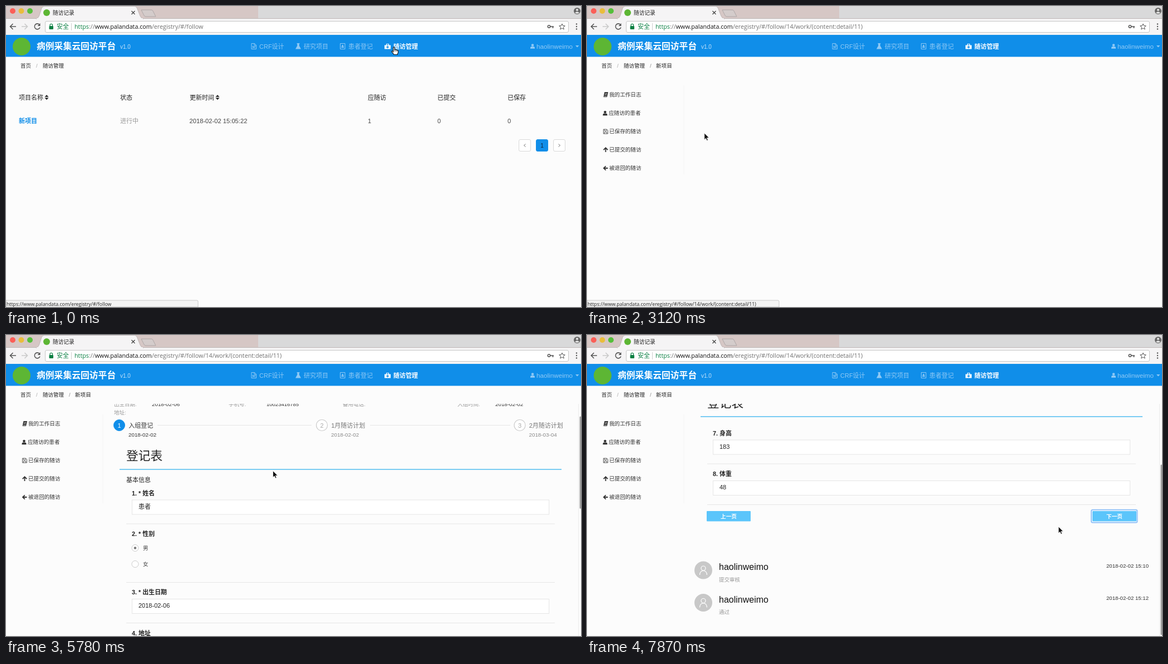
Write an HTML page that moves like this. It is 1033 px wide and 542 px high and loops after 8 s.

```html
<!DOCTYPE html>
<html lang="zh">
<head>
<meta charset="utf-8">
<title>随访记录</title>
<style>
html,body{margin:0;width:100%;height:100%;overflow:hidden;background:#fcfcfc}
svg{display:block;width:1033px;height:542px}
text{font-family:'Liberation Sans','Noto Sans CJK SC','Noto Sans CJK',sans-serif;white-space:pre}
.ui{font-family:'Open Sans','Noto Sans CJK SC','Noto Sans CJK',sans-serif}
</style>
</head>
<body>
<svg id="stage" viewBox="0 0 1033 542" xmlns="http://www.w3.org/2000/svg"></svg>
<script>
const STEP = 148.3, LOOP = 8000;
const BLUE = '#108ee9', SKY = '#5bc5fb', DARK = '#333', GRAY = '#999';
const USER = 'haolinweimo', PHONE = '10023416785', BRAND = '病例采集云回访平台';
const SITE = 'https://www.palandata.com/eregistry/#/follow';
const SHOULD = '/14/work/(content:should)', DETAIL = '/14/work/(content:detail/11)';

// Drawing helpers; text is placed by its vertical centre.
const text = (x, y, s, size = 11, fill = DARK, more = '') =>
  `<text x="${x}" y="${(y + size * .37).toFixed(2)}" font-size="${size}" fill="${fill}" ${more}>${s}</text>`;
const bold = 'font-weight="700"', medium = 'font-weight="500"', mid = 'text-anchor="middle"';
const rect = (x, y, w, h, fill, more = '') =>
  `<rect x="${x}" y="${y}" width="${w}" height="${h}" fill="${fill}" ${more}/>`;
const circle = (x, y, r, fill, more = '') => `<circle cx="${x}" cy="${y}" r="${r}" fill="${fill}" ${more}/>`;
const path = (d, fill, more = '') => `<path d="${d}" fill="${fill}" ${more}/>`;
const line = (d, stroke, w = 1) => path(d, 'none', `stroke="${stroke}" stroke-width="${w}"`);
const group = (id, body, more = '') => `<g id="${id}" ${more}>${body}</g>`;
const at = (x, y, body) => `<g transform="translate(${x} ${y})">${body}</g>`;
const hr = (y, x1 = 216, x2 = 986, c = '#e6e6e6') => line(`M${x1} ${y}H${x2}`, c);
const sort = (x, y, k = 1) => at(x, y, path(`M${-3.6 * k} -.8L0 ${-4.4 * k} ${3.6 * k} -.8ZM${-3.6 * k} .8L0 ${4.4 * k} ${3.6 * k} .8Z`, '#222'));
const person = (x, y, c) => at(x, y, circle(0, -2, 2.3, c) + path('M-4 4.3V2.8Q-4 .4 -1.8 .4H1.8Q4 .4 4 2.8V4.3Z', c));

function browser() {
  const mark = '#5db634';
  return rect(0, 0, 1033, 23, '#d9d9da') + rect(0, 0, 453, 23, '#d6c7c5') +
    circle(12, 9, 5, '#fb5e57') + circle(27.5, 9, 5, '#e9bd3b') + circle(43, 9, 5, '#55bf3a') +
    rect(0, 22, 1033, 30, '#f5f4f5') + line('M0 22.5H1033', '#bdb6b6') +
    path('M54 23Q58 22 59.5 18L64 4Q65.500 .5 69 .5H231Q234 .5 235.500 4L241 18Q242.500 22 247 23Z', '#f5f4f5', 'stroke="#b5aeae" stroke-width=".8"') +
    rect(55, 22, 191, 3, '#f5f4f5') +
    path('M243 7H261Q263 7 264 9L269 19H251Q249 19 248 17Z', '#d4cccb', 'stroke="#a49d9d" stroke-width=".8"') +
    circle(73, 12, 6, mark) + text(84, 12, '随访记录', 9.7, '#222') +
    line('M225.500 9L231.500 15M231.500 9L225.500 15', '#444', 1.3) +
    circle(1026, 9, 6, '#666') + circle(1026, 7, 2.1, '#e4e4e4') + path('M1022 12.500Q1026 8 1030 12.500Q1026 15 1022 12.500', '#e4e4e4') +
    line('M18 37H7.500M12.500 32L7.500 37 12.500 42', '#555', 1.6) +
    line('M28 37H38.500M33.500 32L38.500 37 33.500 42', '#c9c9c9', 1.6) +
    line('M60 33.500A5 5 0 1 0 61 38.500', '#555', 1.6) + path('M61.500 31V36H56.500Z', '#555') +
    rect(70.5, 27.5, 940, 20, '#fff', 'rx="2.500" stroke="#c6c6c6"') +
    rect(77.5, 36, 7.5, 6, '#0b8043', 'rx="1"') + line('M79 36V34.500A2.200 2.200 0 0 1 83.500 34.500V36', '#0b8043', 1.2) +
    text(91, 37, '安全', 11, '#0b8043') + line('M117.500 31V44', '#ccc') +
    text(123, 37, `<tspan fill="#0b8043">https</tspan>://<tspan fill="#111">www.palandata.com</tspan>/eregistry/#/follow<tspan id="url"></tspan>`, 10.75, '#707070', 'class="ui"') +
    circle(975.5, 37, 2.2, 'none', 'stroke="#555" stroke-width="1.500"') + line('M978 37H984M982.500 37V40', '#555', 1.6) +
    path('M999 32L1000.500 35.500 1004.300 35.800 1001.400 38.200 1002.300 42 999 40 995.700 42 996.600 38.200 993.700 35.800 997.500 35.500Z', 'none', 'stroke="#555"') +
    [32.5, 37, 41.5].map(y => circle(1025, y, 1.2, '#555')).join('') +
    rect(0, 52, 1033, 39.5, BLUE) + circle(28, 73, 16, mark) +
    text(55, 72, BRAND, 15.8, '#fff', bold) + text(205, 73, 'v1.0', 10, '#c3e2fa') + nav();
}

function nav() {
  const pale = '#8fc9f5';
  return ['CRF设计', '研究项目', '患者登记'].map((s, i) => text(455 + 80 * i, 72.5, s, 11, pale, medium)).join('') +
    text(696, 72.5, '随访管理', 11, '#fff', bold) +
    line('M441 67.500H446.500L449.500 70.500V77.500H441ZM446 67.500V71H449.500M443 72L444 75.500 445.300 72.500 446.500 75.500 447.500 72', pale) +
    path('M522.500 67H527.500V68.200H526.700V71.500L530 77.500H520L523.300 71.500V68.200H522.500Z', pale) +
    line('M600.500 67.500H609V77.500H600.500Z', pale) + at(604.7, 72.5, `<g transform="scale(.6)">${person(0, 0, pale)}</g>`) +
    path('M680 70.500H683V68H688V70.500H691V77.500H680ZM684 69V70.500H687V69Z', '#fff', 'fill-rule="evenodd"') +
    line('M685.500 71.700V76.300M683.200 74H687.800', BLUE, 1.5) +
    person(946, 72.5, pale) + text(953, 72.5, USER, 11.7, pale) + path('M1023 71H1029.500L1026.200 74.500Z', pale);
}

function crumbs() {
  return text(26, 107.5, '首页', 9.5, '#333') + text(54, 107.5, '/', 9.5, '#aaa') + text(66, 107.5, '随访管理', 9.5, '#222') +
    group('crumb', text(113, 107.5, '/', 9.5, '#888') + text(124, 107.5, '新项目', 9.6, '#222'));
}

function pager(y) {
  const box = (x, fill, edge) => rect(x + .5, y + .5, 21, 21, fill, `rx="2.500" stroke="${edge}"`);
  return box(921, '#fff', '#d9d9d9') + box(952, BLUE, BLUE) + box(983, '#fff', '#d9d9d9') +
    line(`M933.500 ${y + 8.5}L930.500 ${y + 11} 933.500 ${y + 13.5}M992.500 ${y + 8.5}L995.500 ${y + 11} 992.500 ${y + 13.5}`, '#777') +
    text(963, y + 11, '1', 10, '#123', mid);
}

function projects() {
  const head = [[23, '项目名称'], [205, '状态'], [330, '更新时间'], [650, '应随访'], [775, '已提交'], [901, '已保存']];
  return head.map(([x, s]) => text(x, 164.5, s, 11, '#222', medium)).join('') + sort(73, 164.5) + sort(380, 164.5) +
    text(23, 206.5, '新项目', 11, BLUE, bold) + text(205, 206.5, '进行中', 11, GRAY) +
    text(329.5, 206.5, '2018-02-02 15:05:22', 11.2, '#444') +
    text(650, 206.5, '1', 11, '#444') + text(775, 206.5, '0', 11, '#444') + text(901, 206.5, '0', 11, '#444') + pager(240);
}

function sidebar() {
  const names = ['我的工作日志', '应随访的患者', '已保存的随访', '已提交的随访', '被退回的随访'];
  const c = '#333';
  return line('M174 143V303', '#f4f4f4') +
    group('active', rect(17, 177, 157, 32.5, '#e9f5fd') + rect(172, 177, 2, 32.5, BLUE)) +
    names.map((s, i) => text(i == 1 ? 39 : 40, 159.5 + 33.1 * i, s, 9.6, c, `id="item${i}"`)).join('') +
    path('M31.500 155H38L36 164H29.500Z', c) + line('M32.500 157.500H36M32 159.500H35.500M30.500 162.500H35.500', '#fff', .7) +
    group('who', person(32.5, 193, 'currentColor')) +
    line('M29.500 222H35.500L37.500 224V230H29.500ZM31.500 222V225H35V222M31.500 230V227H35.500V230', c, .8) +
    line('M33.500 263V255.500M29.700 259.200L33.500 255.300 37.300 259.200', c, 1.8) +
    line('M37.500 292H30.500M33.800 288.300L30 292 33.800 295.700', c, 1.8);
}

function patients() {
  const head = [[200, '姓名'], [323, '性别'], [446, '生日'], [644, '电话'], [868, '状态']];
  return rect(202, 144, 147, 16, '#e7e3fb', 'rx="2"') + text(209, 152, '审核通过的病例才会成为应随访病例', 8.4, '#9488e6') +
    rect(193, 169, 827, 41.5, '#f5f5f5', 'rx="2"') +
    head.map(([x, s]) => text(x, 190, s, 11, '#222', medium) + sort(x + 28, 190)).join('') +
    text(200, 231.5, '患者', 11, BLUE, bold) + text(323, 231.5, '男', 11, '#888') + text(445.5, 231.5, '2018-02-06', 11.3, '#444') +
    text(644, 231.5, PHONE, 11, '#444') + text(868, 231.5, '审核通过', 11, '#888') + hr(252.5, 193, 1020) + pager(265);
}

const input = (y, val, id = '') => rect(226.5, y + .5, 749, 26, '#fff', 'stroke="#e6e6e6"') +
  text(238, y + 12, val, 11, '#222', id && `id="${id}"`);
const ask = (y, title) => text(226, y, title, 10.9, '#222', bold);
const field = (y, title, val, id) => ask(y, title) + input(y + 12, val, id) + hr(y + 55.5);
const button = (x, y, s) => rect(x, y, 79, 18.6, SKY, 'rx="1"') + text(x + 39.5, y + 9.5, s, 9.6, '#fff', `${bold} ${mid}`);

function comment(y, note, time) {
  return circle(209, y + 6, 16, '#c8c8c8') +
    circle(209, y + 2.5, 4, 'none', 'stroke="#fff" stroke-width="1.200"') +
    path(`M202.500 ${y + 14.5}Q203 ${y + 7} 209 ${y + 7}T215.500 ${y + 14.5}`, 'none', 'stroke="#fff" stroke-width="1.200"') +
    text(237, y, USER, 16, '#111') + text(237, y + 22.5, note, 9.5, GRAY) +
    text(933, y - 2.5, '2018-02-02 ' + time, 9.65, '#333');
}
const comments = y => comment(y, '提交审核', '15:10') + comment(y + 58.5, '通过', '15:12');

function stage(x, n, name, date, on) {
  return circle(x, 210.5, 10, on ? BLUE : '#fff', on ? 'id="dot" stroke-width="1"' : 'stroke="#ccc" stroke-width="1.200"') +
    text(x, 210.5, n, 11, on ? '#fff' : '#aaa', mid) +
    text(x + 16.7, 210.5, name, 11, on ? '#333' : '#777', on ? medium : '') + text(x + 16.5, 227.5, date, 9.8, on ? '#333' : '#888');
}

function detailTop() {
  return text(193.5, 154.5, '患者', 18.6, '#222', bold) + text(236, 155.5, '男', 14.5, '#222') +
    [[194, '出生日期:'], [400, '手机号:'], [605, '备用电话:'], [811, '入组时间:']].map(([x, s]) => text(x, 172.5, s, 9.5, GRAY)).join('') +
    text(194, 187, '地址:', 9.5, GRAY) + text(262, 172.5, '2018-02-06', 9.8) + text(468, 172.5, PHONE, 9.5) + text(879, 172.5, '2018-02-02', 9.8) +
    stage(203.5, 1, '入组登记', '2018-02-02', true) + stage(567.5, 2, '1月随访计划', '2018-02-02') + stage(923, 3, '2月随访计划', '2018-03-04') +
    hr(210.5, 272, 549) + hr(210.5, 654, 906) +
    text(216, 265, '登记表', 21.7, '#222', 'font-weight="300"') + line('M204 290H998', '#4fbdf0', 1.6);
}

function pageOne() {
  const pick = (y, s) => rect(226.5, y + .5, 276, 29, '#fff', 'rx="2.500" stroke="#e2e2e2"') +
    text(234, y + 15, `— — ${s} — —`, 10, '#222') + sort(496, y + 15, .9);
  const radio = (y, s, on) => circle(232, y + .5, 6, '#fff', 'stroke="#ccc"') + (on ? circle(232, y + .5, 2.2, '#777') : '') + text(246, y, s, 9.6, '#444');
  return text(216, 308.5, '基本信息', 11, '#222') + field(332.5, '1. * 姓名', '患者') +
    ask(405.5, '2. * 性别') + radio(431, '男', true) + radio(460, '女') + hr(493.5) +
    field(511, '3. * 出生日期', '2018-02-06', 'birth') +
    ask(584.5, '4. 地址') + pick(596, '省') + pick(625.5, '市') + pick(655, '区') +
    rect(226.5, 691.5, 749, 55, '#fff', 'rx="2" stroke="#e2e2e2"') +
    text(238, 708, '详细地址，例如街道名称，门牌号码，楼层和房间号等信息', 11.07, '#777') +
    line('M968 744.500L973.500 739M971 744.500L973.500 742', '#888', .9) + hr(763.5) +
    field(781, '5. * 电话', PHONE) + field(854.5, '6. 备用电话', '') +
    button(908, 921, '下一页') + comments(1022);
}

function pageTwo() {
  return field(319.5, '7. 身高', '183') + field(393, '8. 体重', '48') + button(215, 460, '上一页') +
    rect(906, 457.8, 82.5, 23, '#fff', 'rx="2.500" stroke="#94c2f7" stroke-width="2"') + button(908, 460, '下一页') + comments(560.5);
}

const arrow = path('M0 0V12L2.700 9.500 4.600 13.600 6.600 12.700 4.800 8.700H8.600Z', '#111', 'stroke="#fff" stroke-width=".8"');
const hand = path('M-1.200 .6Q0 -.8 1.200 .6V4.500Q2.500 3.600 3.400 5Q4.800 4.200 5.500 5.600Q7.300 5 7.500 7V9.500Q7.300 11 6.300 12.300V13.500H-.2Q-1 11.500 -3.700 8.800Q-4.600 7.300 -3.200 7Q-2.200 7 -1.200 8.400Z', '#fff', 'stroke="#111" stroke-width="1.100"') +
  line('M1.200 8V5M3.400 8V5.500M5.500 8.200V6', '#111', .7);

const svg = document.getElementById('stage');
svg.innerHTML = '<clipPath id="view"><rect x="176" y="124" width="857" height="418"/></clipPath>' +
  rect(0, 0, 1033, 542, '#fcfcfc') + browser() + crumbs() +
  group('projects', projects()) + group('sidebar', sidebar()) + group('patients', patients()) +
  group('detail', group('scroll', detailTop() + group('one', pageOne()) + group('two', pageTwo())) +
    line('M1028.500 124V542', '#ececec') + rect(1030.5, 127, 4, 166, '#a0a0a0', 'id="thumb" rx="1.200"'), 'clip-path="url(#view)"') +
  group('status', path('M0 530H343Q345 530 345 532V542H0Z', '#f3f3f3', 'stroke="#bbb" stroke-width=".8"') +
    text(1, 536.5, '', 8.75, '#222', 'class="ui" id="link"')) +
  group('cursor', group('arrow', arrow) + group('hand', hand));

const el = {};
svg.querySelectorAll('[id]').forEach(e => el[e.id] = e);
const show = (id, on) => el[id].setAttribute('display', on ? 'inline' : 'none');
const set = (id, k, v) => el[id].setAttribute(k, v);

// Cursor stops: step, x, y
const trail = [[0, 697, 74], [4, 40, 203], [5, 40, 203], [8, 91, 196], [10, 96, 198], [13, 90, 195], [15, 90, 195],
  [19, 207, 228], [22, 212, 229], [23, 231, 239], [30, 470, 246], [34, 479.5, 244.5], [45, 479.5, 244.5],
  [49, 947, 411], [51, 947, 411], [52, 950, 402], [53, 847, 345]];
const scrolls = [6, 22, 48, 215, 425, 514];

function place(n) {
  const i = Math.max(1, trail.findIndex(k => k[0] >= n));
  const [a, x, y] = trail[i - 1], [b, u, v] = trail[i];
  const p = (n - a) / (b - a), e = (1 - Math.cos(Math.PI * p)) / 2;
  return [x + (u - x) * e, y + (v - y) * e];
}
const within = (n, a, b) => n >= a && n <= b;

function draw(t) {
  const n = Math.min(53, Math.floor((t + 10) / STEP));
  const list = n < 6, table = within(n, 6, 20), second = n >= 51;
  show('projects', list);
  show('crumb', !list);
  show('sidebar', !list);
  show('patients', table);
  show('active', table);
  set('item1', 'fill', table ? BLUE : '#333');
  set('item1', 'font-weight', table ? 700 : 400);
  set('who', 'color', table ? BLUE : '#333');
  el.url.textContent = list ? '' : table ? SHOULD : DETAIL;

  show('detail', n >= 23);
  show('one', !second);
  show('two', second);
  set('dot', 'fill', n < 24 ? '#a9d4f5' : BLUE);
  set('dot', 'stroke', n < 24 ? '#8b9bb0' : BLUE);
  show('birth', n >= 24);
  const pos = second ? 143 : n < 37 ? 0 : scrolls[Math.min(n - 37, 5)];
  const k = 418 / (second ? 561 : 1022);
  set('scroll', 'transform', `translate(0 ${-pos})`);
  set('thumb', 'y', 127 + pos * k);
  set('thumb', 'height', 418 * k - 5);

  const tail = n < 1 ? '' : within(n, 4, 5) ? '/14' : within(n, 8, 17) ? SHOULD : within(n, 18, 24) ? DETAIL : null;
  show('status', tail !== null);
  el.link.textContent = SITE + (tail || '');

  const point = n < 1 || within(n, 4, 5) || within(n, 8, 20) || within(n, 49, 50);
  show('hand', point);
  show('arrow', !point);
  set('cursor', 'transform', `translate(${place(n).map(v => v.toFixed(1)).join(' ')})`);
}

const start = performance.now();
function tick() {
  draw((performance.now() - start) % LOOP);
  requestAnimationFrame(tick);
}
tick();
</script>
</body>
</html>
```
